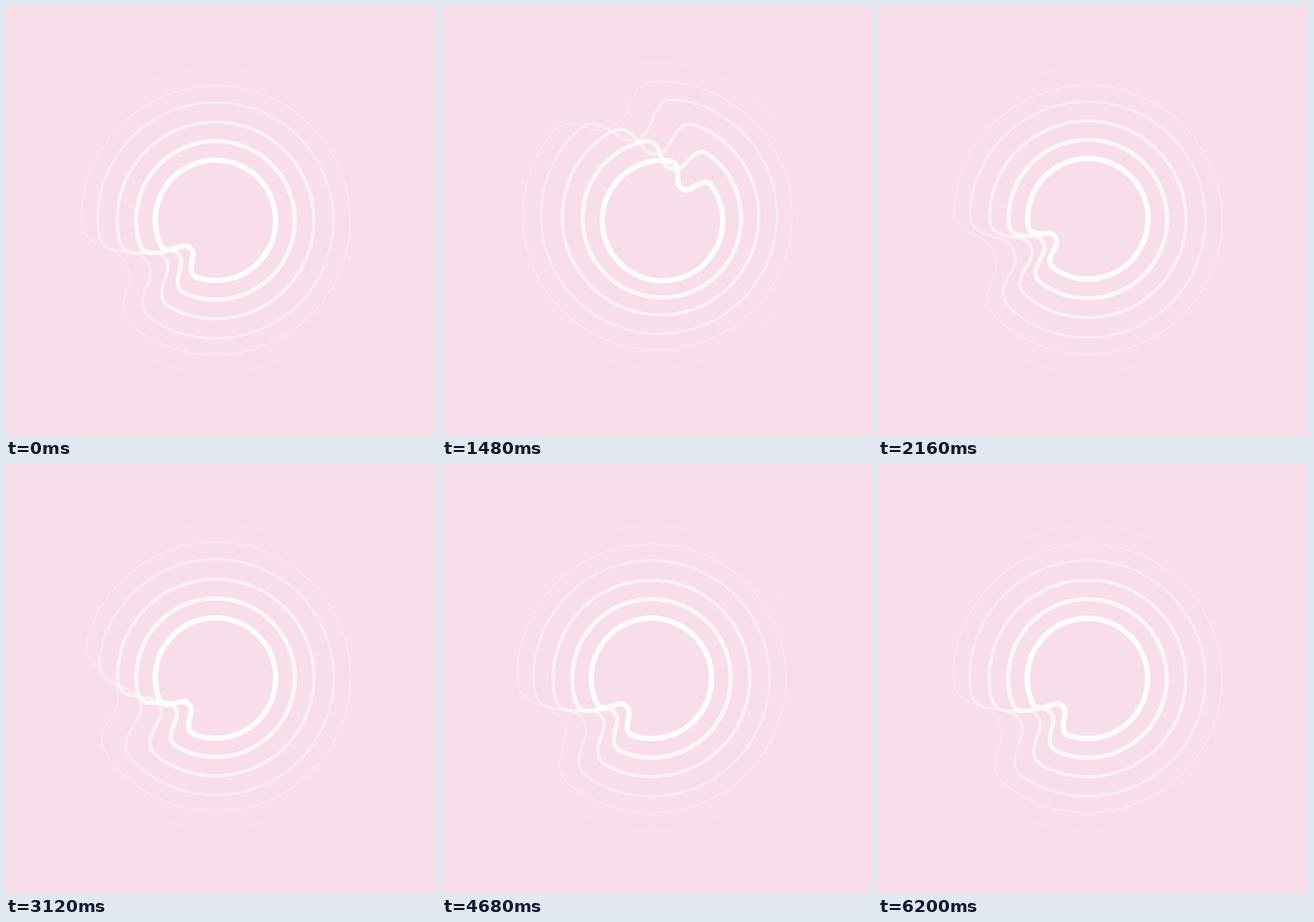
Animation of 700x700 px, one loop 9560 ms. Source, as an HTML page with a canvas:

```html
<!DOCTYPE html>
<html lang="en">
<head>
<meta charset="utf-8">
<title>Notched rings</title>
<style>
html, body { margin: 0; height: 100%; overflow: hidden; background: #f7deea; }
canvas { display: block; width: 100vmin; height: 100vmin; }
</style>
</head>
<body>
<canvas width="700" height="700"></canvas>
<script>
const ctx = document.querySelector('canvas').getContext('2d');
const LOOP = 9560, STEP = 40, MID = 350, CX = 341, CY = 349;
const rad = degrees => degrees * Math.PI / 180;
const sigmoid = x => 1 / (1 + Math.exp(-x));

const rings = [98, 129, 160, 192, 219, 249].map((radius, i) => ({
  radius,
  width: 2 + 6.7 * (1 - i / 5) ** 1.3,
  alpha: .12 + .77 * (1 - i / 5) ** 1.2,
  waves: Math.round(radius / 7.5),
  axis: rad(60 + 40 * i),
  points: outline(radius, i)
}));

// Circle with a soft-edged dent, as polar points [radius, angle] around the stage centre
function outline(radius, i) {
  const depth = 37 + 26 * Math.sin(Math.PI * (i / 5.4) ** 1.2);
  const points = [];
  for (let a = 0; a < 360; a += .75) {
    const dent = sigmoid((a - 119 - 5.4 * i) / (2.4 + .15 * i))
               * sigmoid((145 + 5.6 * i - a) / (2.1 + .23 * i));
    const r = radius - depth * dent;
    const x = CX + r * Math.cos(rad(a)) - MID, y = CY + r * Math.sin(rad(a)) - MID;
    points.push([Math.hypot(x, y), Math.atan2(y, x)]);
  }
  return points;
}

// Quick swing out, slower return
const pulse = u => Math.sin(Math.PI * u ** .7);
const squeeze = (u, i) => ({ turn: 1.5 * i * pulse(u), press: pulse(u) });

// start, length, pose of ring i (turn in degrees)
const moves = [
  [40, 960, (u, i) => ({ turn: 1.3 * (6 - i) * pulse(u) })],
  [1000, 960, (u, i) => ({ turn: 360 * Math.sin(Math.PI * u / 2) ** (2 * (1.09 + .23 * i)) })],
  [1960, 960, (u, i) => ({ turn: 3.35 * (6 - i) * pulse(u) })],
  [2920, 960, (u, i) => ({ turn: 3.85 * (i + 1) * pulse(u) })],
  [3880, 800, squeeze],
  [5360, 840, squeeze]
];

function draw(time) {
  ctx.clearRect(0, 0, 700, 700);
  ctx.strokeStyle = '#fff';
  ctx.lineJoin = 'round';
  const move = moves.find(([start, length]) => time > start && time < start + length);
  rings.forEach((ring, i) => {
    const { turn = 0, press = 0 } = move ? move[2]((time - move[0]) / move[1], i) : {};
    const scale = 1 - .063 * press;
    ctx.lineWidth = ring.width * scale;
    ctx.globalAlpha = ring.alpha;
    ctx.beginPath();
    for (const [r, a] of ring.points) {
      const ripple = 1.7 * Math.sin(ring.waves * a + 1.8) * Math.cos(a - ring.axis);
      const d = r * scale + ripple * press, b = a + rad(turn);
      ctx.lineTo(MID + d * Math.cos(b), MID + d * Math.sin(b));
    }
    ctx.closePath();
    ctx.stroke();
  });
}

const begin = performance.now();
function tick() {
  const time = (performance.now() - begin) % LOOP;
  draw(Math.floor(time / STEP) * STEP);
  requestAnimationFrame(tick);
}
tick();
</script>
</body>
</html>
```
